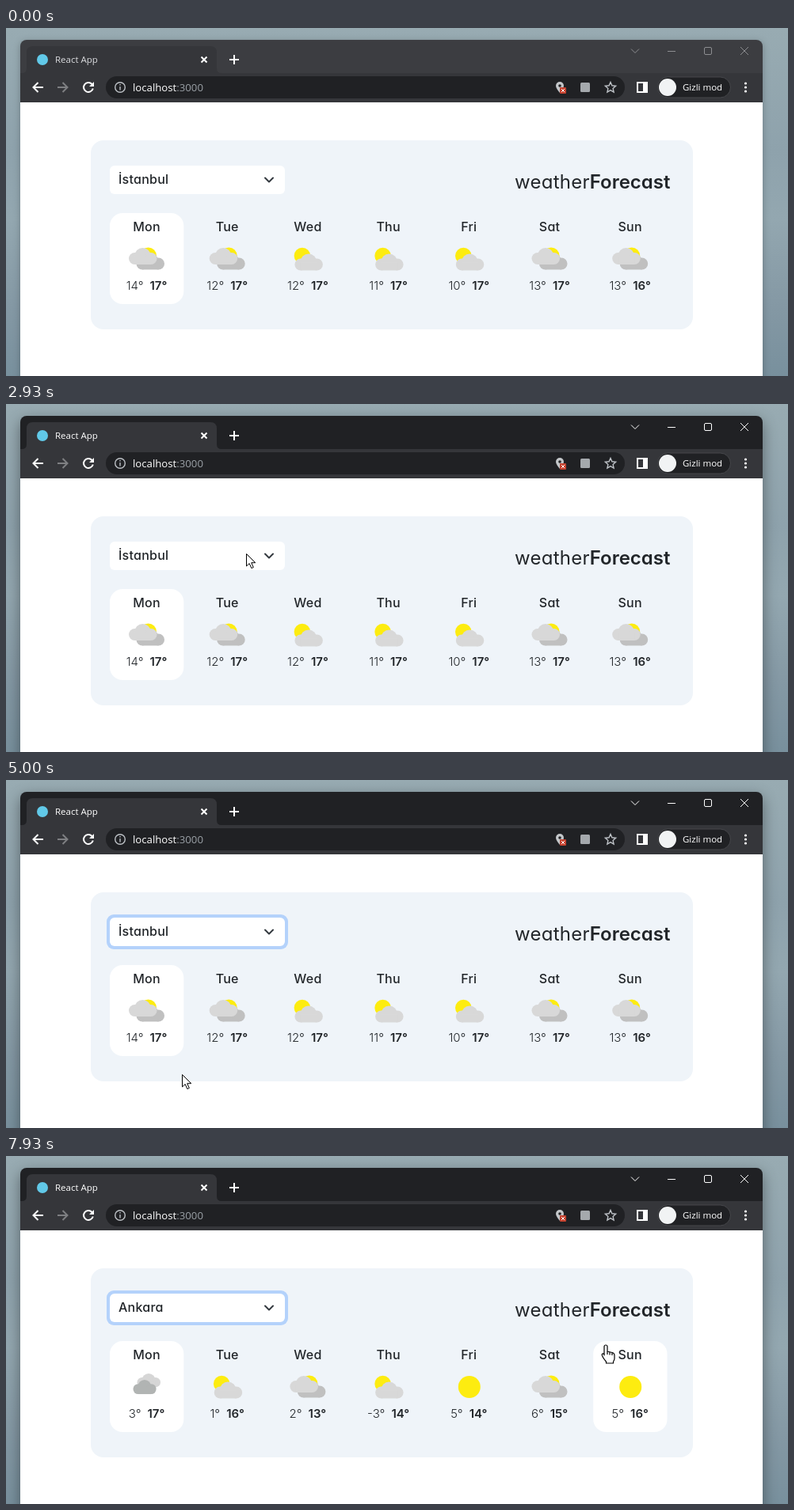
Animation of 987 by 440 pixels, one loop 8000 ms. Source, as an HTML page:

```html
<!DOCTYPE html>
<html lang="tr">
<head>
<meta charset="utf-8">
<title>Weather forecast</title>
<style>
html, body { margin: 0; width: 100%; height: 100%; overflow: hidden; background: #8fa3ad; }
svg { display: block; width: 987px; height: 440px; }
text { white-space: pre; }
.chrome text { font-family: "Open Sans", "Noto Sans", sans-serif; font-size: 11.5px; fill: #fff; }
.page text { font: 500 16px Inter, "Open Sans", sans-serif; font-feature-settings: "cv11"; letter-spacing: .25px; fill: #212529; }
.page .temps { font-size: 15px; letter-spacing: 0; text-anchor: middle; }
.page .day { text-anchor: middle; }
.page .brand { font-size: 24px; font-weight: 400; }
.light { font-weight: 300; }
.bold { font-weight: 600; letter-spacing: 0; }
.line { fill: none; stroke: #fff; stroke-width: 2; }
.thin { fill: none; stroke-width: 1; }
</style>
</head>
<body>
<svg viewBox="0 0 987 440">
  <defs>
    <linearGradient id="wall" x2="0" y2="1">
      <stop offset="0" stop-color="#98abb2"/>
      <stop offset=".35" stop-color="#8ea2ac"/>
      <stop offset=".55" stop-color="#93a7b0"/>
      <stop offset=".8" stop-color="#8498a4"/>
      <stop offset="1" stop-color="#78909d"/>
    </linearGradient>
    <g id="cloud">
      <circle cx="7.5" cy="13.5" r="7.5"/>
      <circle cx="17.5" cy="10.3" r="10.3"/>
      <circle cx="28" cy="13.5" r="7.5"/>
      <path d="M7.5 11H28V21H7.5z"/>
    </g>
    <g id="cloudy">
      <circle cx="2" cy="288" r="10.5" fill="#fdec10"/>
      <use href="#cloud" x="-13" y="284.5" fill="#c0c0c0"/>
      <use href="#cloud" x="-22.5" y="278" fill="#d8d8d8"/>
    </g>
    <g id="partly">
      <circle cx="-7" cy="288" r="10.3" fill="#fdec10"/>
      <use href="#cloud" x="-16.5" y="285.5" fill="#d8d8d8"/>
    </g>
    <g id="clear"><circle cx=".5" cy="292" r="14" fill="#fdec10"/></g>
    <g id="overcast">
      <use href="#cloud" transform="translate(-12 275) scale(.83)" fill="#d6d6d6"/>
      <use href="#cloud" transform="translate(-17 283) scale(.82 .86)" fill="#b1b4b3"/>
    </g>
  </defs>

  <rect width="987" height="440" fill="url(#wall)"/>
  <g class="chrome">
    <path id="frame" d="M18 460V23a8 8 0 0 1 8-8H947a8 8 0 0 1 8 8V460z"/>
    <path d="M18 94V57h2q6 0 6-6V31q0-8 8-8H258q8 0 8 8v20q0 6 6 6H955V94z" fill="#35363a"/>
    <circle cx="46" cy="40" r="7" fill="#61c9e8"/>
    <text id="tabTitle" x="62" y="44">React App</text>
    <path class="line" d="M246.500 36.500l7 7m0-7l-7 7" stroke-width="1.6"/>
    <path class="line" d="M282 40h12M288 34v12"/>
    <g id="controls" class="thin">
      <path d="M789 26.500l5 5 5-5M835 29.500h10M927 24l10 10m0-10l-10 10"/>
      <rect x="881.500" y="24.500" width="9" height="9" rx="1.500"/>
    </g>
    <path class="line" d="M47 75H34.500m6-6l-6 6 6 6"/>
    <path class="line" d="M65 75h12.500m-6-6l6 6-6 6" style="stroke:#7e7f82"/>
    <path class="line" d="M108.500 71a6 6 0 1 0 1.300 5.500"/>
    <path d="M111 68v6h-6z" fill="#fff"/>
    <rect x="126" y="61" width="655" height="28" rx="14" fill="#202124"/>
    <g fill="none" stroke="#bdc1c6" stroke-width="1.400">
      <circle cx="144" cy="75" r="6.300"/>
      <path d="M144 74v4.500M144 71v1.500"/>
      <path d="M763 68.500l1.900 4.300 4.700.5-3.500 3.100 1 4.600-4.100-2.400-4.100 2.400 1-4.600-3.500-3.100 4.700-.5z"/>
    </g>
    <text x="160" y="80" style="font-size:13.200px">localhost<tspan fill="#9aa0a6">:3000</tspan></text>
    <path d="M699 82q-5-6-5-9a5 5 0 0 1 10 0q0 3-5 9z" fill="#c4c7ca"/>
    <circle cx="699" cy="73" r="1.800" fill="#202124"/>
    <rect x="699" y="75" width="8" height="8" rx="1" fill="#c5422f"/>
    <path d="M701 77l4 4m0-4l-4 4" stroke="#fff"/>
    <rect x="725" y="69" width="12" height="12" rx="1.500" fill="#a5a9ad"/>
    <path d="M796 68h14v14h-14zM798 70v10h6v-10z" fill="#fff" fill-rule="evenodd"/>
    <rect x="822.500" y="62" width="92" height="26" rx="13" fill="#202124" stroke="#46474b"/>
    <circle cx="835" cy="75" r="11" fill="#f1f3f4"/>
    <text x="854" y="79" style="font-weight:500">Gizli mod</text>
    <g fill="#fff">
      <circle cx="933.500" cy="70" r="1.600"/><circle cx="933.500" cy="75" r="1.600"/><circle cx="933.500" cy="80" r="1.600"/>
    </g>
  </g>

  <g class="page">
    <path d="M18 94H955V440H18z" fill="#fff"/>
    <rect x="107" y="142" width="760" height="239" rx="16" fill="#eff4f9"/>
    <rect id="ring" x="127" y="170" width="229" height="44" rx="9" fill="#b4d2fb"/>
    <rect x="131" y="174" width="221" height="36" rx="6" fill="#fff"/>
    <text id="city" x="142" y="197"></text>
    <path d="M327 189.500l5 5 5-5" class="line" style="stroke:#343a40" stroke-linecap="round" stroke-linejoin="round"/>
    <text class="brand" x="642" y="203">weather<tspan class="bold">Forecast</tspan></text>
    <g id="days"></g>
    <g id="menu">
      <rect x="131.500" y="210.500" width="220" height="260" rx="2" fill="#fff" stroke="#8a8d91"
            style="filter:drop-shadow(0 6px 10px rgba(0,0,0,.28))"/>
      <rect id="mark" x="132" width="202" height="26" fill="#1e90ff"/>
      <path d="M334 211h17V440h-17z" fill="#f1f1f1"/>
      <path d="M336 228h13v120h-13z" fill="#c1c1c1"/>
      <path d="M338.500 222l4-4 4 4z" fill="#8b8b8b"/>
      <g id="options"></g>
    </g>
  </g>

  <g id="cursor" fill="#fff" stroke="#000" stroke-linejoin="round">
    <path id="arrow" d="M.5 .5v15.500l3.700-3.400 2.600 6 2.500-1.100-2.600-5.800h5z"/>
    <g id="hand" stroke-width="1.200">
      <path d="M-2 13V2a2 2 0 0 1 4 0v6l6 1.500q3 .8 3 3.500v4q0 2-1.500 4v2h-9v-2q-3-3-5-7.500c-1-2.500 1-3.500 2.500-1.500z"/>
      <path d="M2 8v4M5 9v3.500M8 10v3" fill="none"/>
    </g>
  </g>
</svg>
<script>
const LOOP = 8000, TICK = 200 / 3, FADE = 150;
const ROW = 26, LIST_TOP = 211;
const OPEN = 3260, CLOSE = 4995, PICK = 5060, DATA = 5460, LOADED = 5660;
const $ = id => document.getElementById(id);
const clamp = v => Math.max(0, Math.min(1, v));

const dayNames = ["Mon", "Tue", "Wed", "Thu", "Fri", "Sat", "Sun"];
const cities = ["İstanbul", "Adana", "Adıyaman", "Afyonkarahisar", "Ağrı", "Amasya", "Ankara", "Antalya", "Artvin"];
const forecasts = [
  { low: [14, 12, 12, 11, 10, 13, 13], high: [17, 17, 17, 17, 17, 17, 16],
    icons: ["cloudy", "cloudy", "partly", "partly", "partly", "cloudy", "cloudy"] },
  { low: [3, 1, 2, -3, 5, 6, 5], high: [17, 16, 13, 14, 14, 15, 16],
    icons: ["overcast", "partly", "cloudy", "partly", "clear", "cloudy", "clear"] }
];

// Pointer positions: time, x, y
const route = [
  [2200, 257, 321], [2733, 301, 189], [2867, 302, 189], [2933, 303, 189],
  [3600, 303, 189], [3800, 323, 205], [4000, 310, 240], [4400, 246, 302],
  [4467, 243, 309], [4667, 230, 360], [4800, 222, 372], [6000, 222, 372],
  [6333, 267, 299], [6867, 424, 245], [7667, 742, 252], [7933, 757, 239]
];

const cardLeft = i => 131 + 101.7 * i;

function pointer(t) {
  const next = route.findIndex(p => p[0] > t);
  if (next === 0) return { x: route[0][1], y: route[0][2] };
  if (next < 0) return { x: route.at(-1)[1], y: route.at(-1)[2] };
  const [t0, x0, y0] = route[next - 1], [t1, x1, y1] = route[next];
  const k = (t - t0) / (t1 - t0);
  return { x: x0 + (x1 - x0) * k, y: y0 + (y1 - y0) * k };
}

function hoveredDay(t) {
  if (t < PICK) return -1;
  const { x, y } = pointer(t);
  if (y < 234 || y > 349) return -1;
  return dayNames.findIndex((_, i) => x >= cardLeft(i) && x <= cardLeft(i) + 93.5);
}

// Share of the last FADE ms spent over a card: a linear fade in and out
function hoverLevel(i, t) {
  let hits = 0;
  for (let k = 0; k < 15; k++) hits += hoveredDay(t - k * FADE / 15) === i;
  return hits / 15;
}

$("days").innerHTML = dayNames.map((name, i) => `
  <rect class="card" x="${cardLeft(i)}" y="234" width="93.3" height="115" rx="16" fill="#fff"/>
  <g transform="translate(${cardLeft(i) + 46.5} 0)">
    <text class="day" y="257">${name}</text>
    <use class="icon"/>
    <text class="temps" y="331"><tspan class="light low"></tspan><tspan class="bold high" dx="8"></tspan></text>
  </g>`).join("");
$("options").innerHTML = cities.map((name, i) =>
  `<text x="144" y="${LIST_TOP + 18 + ROW * i}">${name}</text>`).join("");

const all = name => [...document.querySelectorAll(name)];
const cards = all(".card"), icons = all(".icon"), lows = all(".low"), highs = all(".high");
const options = [...$("options").children];
const show = (el, on) => el.style.display = on ? "" : "none";

function drawWindow(active) {
  $("frame").style.fill = active ? "#202124" : "#3c3d41";
  $("frame").style.filter = `drop-shadow(0 ${active ? 6 : 2}px ${active ? 9 : 4}px rgba(0,0,0,${active ? .4 : .25}))`;
  $("controls").style.stroke = active ? "#fff" : "#8d8e91";
  $("tabTitle").style.fill = active ? "#fff" : "#dcdde0";
}

function drawDays(t) {
  const data = forecasts[+(t >= DATA)];
  dayNames.forEach((_, i) => {
    const wanted = data.icons[i];
    const cached = forecasts[0].icons.includes(wanted);
    const icon = cached || t >= LOADED ? wanted : forecasts[0].icons[i];
    icons[i].setAttribute("href", "#" + icon);
    lows[i].textContent = data.low[i] + "°";
    highs[i].textContent = data.high[i] + "°";
    cards[i].style.opacity = i === 0 ? 1 : hoverLevel(i, t);
  });
}

function drawMenu(t, y) {
  const open = t >= OPEN && t < CLOSE;
  const row = Math.max(0, Math.floor((y - LIST_TOP) / ROW));
  show($("menu"), open);
  $("mark").setAttribute("y", LIST_TOP + ROW * row);
  options.forEach((el, i) => {
    el.style.fill = i === row ? "#fff" : "";
    el.style.fontWeight = i === row ? 600 : "";
  });
  $("ring").style.opacity = clamp((t - 3130) / FADE);
  $("city").textContent = t >= PICK ? "Ankara" : "İstanbul";
}

function draw(t) {
  const { x, y } = pointer(t);
  const overCard = hoveredDay(t) >= 0;
  drawWindow(t >= 1060);
  drawDays(t);
  drawMenu(t, y);
  show($("cursor"), t >= 2195);
  show($("hand"), overCard);
  show($("arrow"), !overCard);
  $("cursor").setAttribute("transform", `translate(${Math.round(x)} ${Math.round(y)})`);
}

const start = performance.now();
function frame() {
  const t = (performance.now() - start) % LOOP;
  draw(Math.floor((t + 4) / TICK) * TICK);
  requestAnimationFrame(frame);
}
draw(0);
requestAnimationFrame(frame);
</script>
</body>
</html>
```
